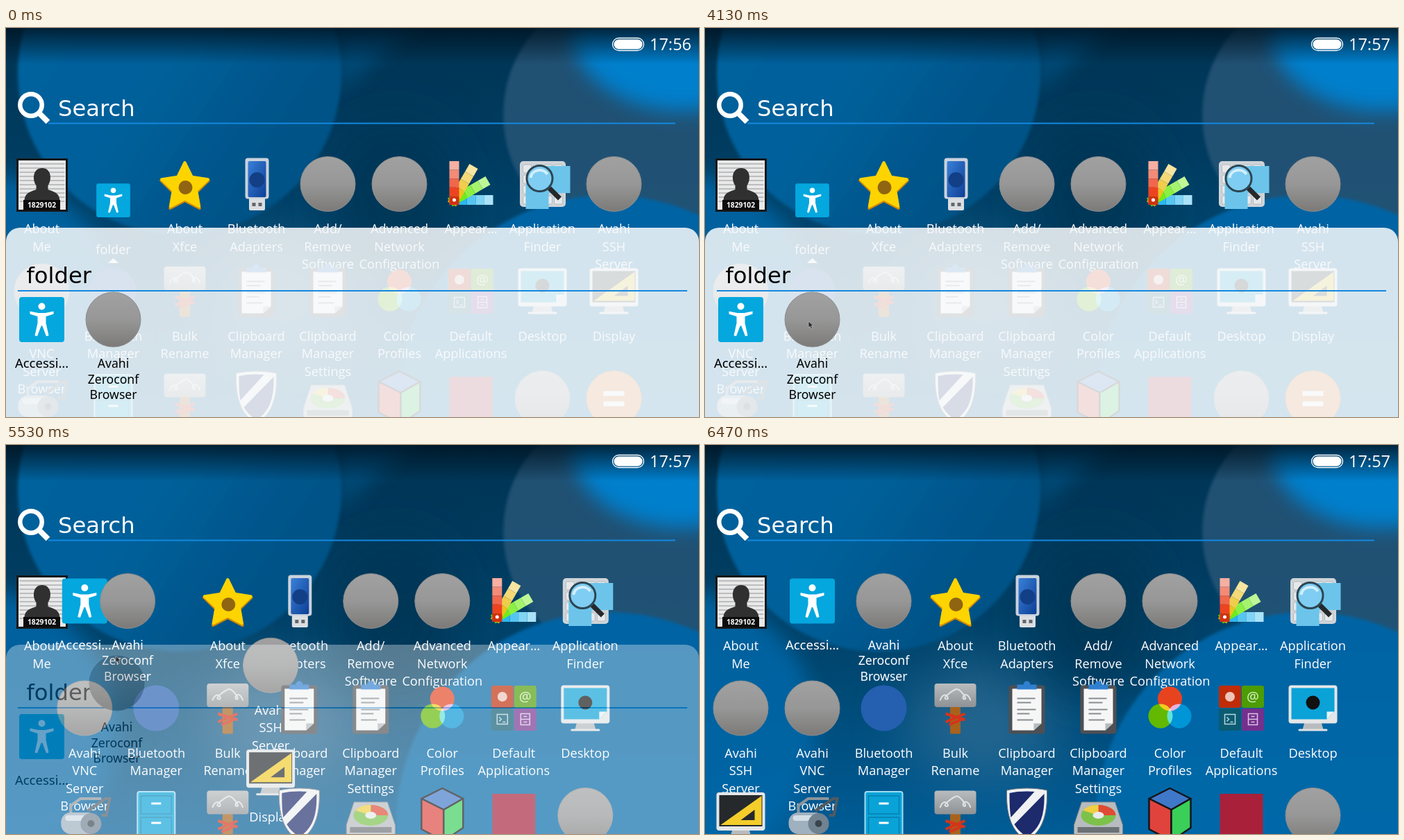
Recreate the animation shown at these times as an HTML page. Size 998x561 px, loop 7140 ms.

```html
<!DOCTYPE html>
<html lang="en">
<head>
<meta charset="utf-8">
<title>Launcher folder</title>
<style>
html, body { margin: 0; width: 100%; height: 100%; overflow: hidden; background: #003a60; }
svg { display: block; width: 100vw; height: 100vh; }
.label { font: 18.2px "Open Sans", "Noto Sans", sans-serif; fill: #fff; text-anchor: middle; }
.small { font-family: "Noto Sans", "Open Sans", sans-serif; }
.dark .label { fill: #000; }
.big { font: 32.2px "DejaVu Sans", sans-serif; }
.clock { font: 23.5px "Open Sans", "Noto Sans", sans-serif; fill: #fff; }
.num { font: bold 10.3px "Noto Sans", sans-serif; fill: #fff; text-anchor: middle; }
.at { font: 20px "Noto Sans", sans-serif; fill: #d9efc0; text-anchor: middle; }
.mix { isolation: isolate; }
.mix circle { mix-blend-mode: screen; }
</style>
</head>
<body>
<svg id="stage" viewBox="0 0 998 561" preserveAspectRatio="none">
  <defs>
    <linearGradient id="base" x2="0" y2="1">
      <stop offset="0" stop-color="#003453"/><stop offset=".3" stop-color="#003c60"/>
      <stop offset=".55" stop-color="#00466f"/><stop offset="1" stop-color="#005c96"/>
    </linearGradient>
    <linearGradient id="leftDisc" x2=".9" y2=".6">
      <stop offset="0" stop-color="#02649f"/><stop offset=".6" stop-color="#01609a"/><stop offset="1" stop-color="#005286"/>
    </linearGradient>
    <linearGradient id="rightDisc" x2="0" y2="1">
      <stop offset="0" stop-color="#0064a3"/><stop offset=".5" stop-color="#0068a8"/><stop offset="1" stop-color="#0474b6"/>
    </linearGradient>
    <linearGradient id="topShade" x2="0" y2="1">
      <stop offset="0" stop-color="#001524" stop-opacity=".85"/><stop offset="1" stop-color="#001524" stop-opacity="0"/>
    </linearGradient>
    <linearGradient id="grey" x2="0" y2="1">
      <stop offset="0" stop-color="#a1a1a1"/><stop offset=".5" stop-color="#979797"/><stop offset="1" stop-color="#7b7a78"/>
    </linearGradient>
    <linearGradient id="blue" x2="1" y2="1">
      <stop offset="0" stop-color="#3a80d8"/><stop offset="1" stop-color="#0d3f96"/>
    </linearGradient>
    <linearGradient id="metal" x2="0" y2="1">
      <stop offset="0" stop-color="#b9bcbe"/><stop offset="1" stop-color="#8f9294"/>
    </linearGradient>
    <filter id="soft" x="-50%" y="-50%" width="200%" height="200%"><feGaussianBlur stdDeviation="14"/></filter>
    <filter id="wide" x="-80%" y="-80%" width="260%" height="260%"><feGaussianBlur stdDeviation="40"/></filter>
    <filter id="edge"><feGaussianBlur stdDeviation="2"/></filter>
  </defs>

  <rect width="998" height="561" fill="url(#base)"/>
  <circle cx="-40" cy="410" r="200" fill="#0069ab" opacity=".8" filter="url(#soft)"/>
  <ellipse cx="400" cy="400" rx="110" ry="85" fill="#447a9e" opacity=".5" filter="url(#wide)"/>
  <ellipse cx="560" cy="250" rx="90" ry="110" fill="#003150" opacity=".7" filter="url(#wide)"/>
  <path d="M470 -30H610L480 95Z" fill="#005286" opacity=".7" filter="url(#soft)"/>
  <circle cx="250" cy="65" r="233" fill="url(#leftDisc)" filter="url(#edge)"/>
  <circle cx="900" cy="125" r="184" fill="#275577" opacity=".85" filter="url(#edge)"/>
  <ellipse cx="975" cy="5" rx="160" ry="115" fill="#067fcc" filter="url(#soft)"/>
  <circle cx="868" cy="547" r="306" fill="url(#rightDisc)" filter="url(#edge)"/>
  <rect width="998" height="52" fill="url(#topShade)"/>

  <rect x="873.5" y="14.5" width="45" height="18" rx="9" fill="none" stroke="#fff" stroke-width="1.3"/>
  <rect x="875.5" y="16.500" width="41" height="14" rx="7" fill="#fff"/>
  <text id="clock" class="clock" x="927" y="32.300">17:56</text>

  <g fill="none" stroke="#fff">
    <circle cx="36" cy="111" r="15.7" stroke-width="6.500"/>
    <path d="M47.500 122.500L60.500 135.500" stroke-width="8"/>
  </g>
  <path d="M61 137.500H964" stroke="#1488df" stroke-width="2"/>
  <text class="big" x="75" y="126.500" fill="#fff">Search</text>

  <g id="grid"></g>
  <g id="folder"></g>
  <g id="panel" class="dark">
    <path d="M0 561V308A20 20 0 0 1 20 288H978A20 20 0 0 1 998 308V561Z" fill="#f7fafb" fill-opacity=".86"/>
    <text class="big" x="29.500" y="368">folder</text>
    <path d="M17 379H981" stroke="#1488df" stroke-width="2"/>
  </g>
  <path id="cursor" d="M0 0V9L2.200 7.300L4 10.800L5.600 10L4 6.700L6.800 6.300Z" fill="#26282a" stroke="#c4c4c4" stroke-width=".7"/>
</svg>
<script>
const $ = id => document.getElementById(id);
const rect = (x, y, w, h, fill, more = '') =>
  `<rect x="${x}" y="${y}" width="${w}" height="${h}" fill="${fill}" ${more}/>`;
const circle = (x, y, r, fill, more = '') => `<circle cx="${x}" cy="${y}" r="${r}" fill="${fill}" ${more}/>`;
const shape = (d, fill, more = '') => `<path d="${d}" fill="${fill}" ${more}/>`;
const line = (d, color, width = 2) => shape(d, 'none', `stroke="${color}" stroke-width="${width}"`);
const repeat = (n, make) => Array.from({ length: n }, (_, i) => make(i)).join('');

const starPath = (r, inner) => 'M' + Array.from({ length: 10 }, (_, i) => {
  const a = (i / 5 - 0.5) * Math.PI, d = i % 2 ? inner : r;
  return `${(d * Math.cos(a)).toFixed(1)} ${(d * Math.sin(a)).toFixed(1)}`;
}).join('L') + 'Z';

const strip = (angle, hue, light) => `<g transform="translate(-24 23) rotate(${angle})">` +
  repeat(5, i => rect(-7, -56 + i * 12.6, 14, 12.6, `hsl(${hue} 85% ${light - i * 9}%)`)) + '</g>';

const monitor = screen =>
  shape('M-12 20H12L15 31H-15Z', '#b9bcbf') + rect(-21, 30, 42, 3, '#dfe1e3', 'rx="1.5"') +
  rect(-35, -33, 70, 55, '#e4e6e8', 'rx="4"') + screen;

const icons = {
  disc: circle(0, 0, 39.5, 'url(#grey)', 'stroke="#8d8d8d"'),
  me: rect(-35, -35.5, 71, 74, '#e9e9e9', 'stroke="#16181a" stroke-width="3"') +
    line(repeat(10, i => `M-32 ${-29 + i * 6}H33`), '#aeb0b2', 1.5) +
    shape('M-25 30C-26 14 -20 12 -8 8V2C-14 -6 -13 -23 0.500 -23S15 -6 9 2V8C21 12 27 14 26 30Z', '#303030') +
    rect(-26.5, 23, 53, 15, '#0c0c0c') + '<text class="num" y="34">1829102</text>',
  access: rect(-32.5, -32.5, 65, 65, '#04a7de', 'rx="4"') + circle(0, -19, 5, '#fff') +
    shape('M-17 -12L-5 -9.500H5L17 -12V-8L6 -4.500V5L10 23L6.500 24L0.800 9H-0.800L-6.500 24L-10 23L-6 5V-4.500L-17 -8Z', '#fff'),
  star: `<g transform="translate(0 4)" stroke-linejoin="round" stroke-width="4">` +
    shape(starPath(36, 18), '#d18a00', 'stroke="#d18a00" transform="translate(0 2)"') +
    shape(starPath(35, 17.5), '#fdd400', 'stroke="#fdd400"') + '</g>' + circle(1, 5, 10, '#8f6512'),
  usb: rect(-10.5, 19, 23, 19, '#dcdfe2', 'rx="2"') + rect(-6, 27, 5, 5, '#63676b') + rect(3, 27, 5, 5, '#63676b') +
    rect(-16, -37.5, 34, 59, '#c9d2dc', 'rx="4"') + rect(-12, -33, 26, 52, 'url(#blue)', 'rx="2"') +
    circle(1, -6, 11, '#123f86'),
  fan: strip(90, 197, 82) + strip(60, 95, 78) + strip(30, 47, 80) + strip(0, 10, 80) + circle(-24, 23, 2.5, '#fff'),
  finder: rect(-32.5, -33, 66, 66, '#cfd4d8', 'rx="5"') +
    repeat(16, i => rect(-28 + i % 4 * 15, -28 + (i >> 2) * 15, 12, 12, '#e6e9eb', 'rx="2" stroke="#aab1b7" stroke-width=".8"')) +
    rect(0, -26, 40, 39, '#6cc4ea') + rect(-24, 0, 33, 36, '#6cc4ea') +
    line('M10 6L25 21', '#26282b', 7) +
    circle(-4, -8, 18.5, '#7fcdf2', 'stroke="#2c4654" stroke-width="3"') +
    line('M-17 -9C-15 -22 2 -23 7 -14', '#d3effc', 4),
  bt: circle(0, 0, 33, '#245fb0'),
  hammer: rect(-7.5, -3, 15, 40, '#a8621c', 'rx="2"') + line('M-14 8L14 17M14 8L-14 20M-9 24L12 15', '#d5341b', 4) +
    rect(-30, -35.5, 60, 34, 'url(#metal)', 'rx="4"') +
    line('M-22 -11C-16 -28 -6 -12 -13 -13S-6 -24 0 -27S19 -12 13 -13S16 -28 22 -11', '#dfe2e3'),
  clip: rect(-26, -33, 52, 70, '#4d5054', 'rx="4"') + shape('M-21 -28H21V22L10 32H-21Z', '#f6f6f6') +
    shape('M21 22H10V32Z', '#b7babd') +
    line('M-14 -14H12M-14 -8H6M-14 2H13M-14 8H4M-14 17H9', '#8a8d90', 1.8) +
    shape('M-14 -27V-34H-5A5 5 0 0 1 5 -34H14V-27Z', '#2f7fd0'),
  color: '<g class="mix">' + circle(0, -13.5, 17.5, '#e8431f') + circle(-13.5, 11.5, 17.5, '#62b900') +
    circle(13.5, 11.5, 17.5, '#0095d6') + '</g>',
  tiles: rect(-32.5, -32.5, 32, 32, '#c02c08', 'rx="3"') + rect(0.5, -32.5, 32, 32, '#4c9c04', 'rx="3"') +
    rect(-32.5, 0.5, 32, 32, '#0b5b72', 'rx="3"') + rect(0.5, 0.5, 32, 32, '#74308d', 'rx="3"') +
    circle(-16.5, -16.5, 7, '#efc4b8') + '<text class="at" x="16.500" y="-10">@</text>' +
    line('M-24 9H-9V23H-24ZM-21 13L-18 16L-21 19M-16 20H-12', '#b8d5de', 1.5) +
    line('M10 8H23V24H10ZM10 16H23M14 12H19M14 20H19', '#dcc3e6', 1.5),
  desktop: monitor(shape('M-31 -29H31V5L20 16H-31Z', '#0ba2d8') + shape('M31 5H20V16Z', '#e8f3f8') +
    circle(0, -8, 10, '#111')),
  display: monitor(rect(-31, -29, 62, 45, '#25292c') +
    shape('M-29 14L30 -28V14ZM0 7H20V-8Z', '#f4cd2a', 'fill-rule="evenodd"')),
  roller: line('M4 -6L30 -24H36L31 0H24', '#515a61', 4) + line('M-20 2V-14L-6 -24H24', '#8a949c', 4) +
    rect(-34, -4, 52, 31, '#9fb0be', 'rx="14"') + rect(-28, 0, 36, 8, '#d3dde5', 'rx="4"') +
    circle(9, 12, 15, '#718290') + circle(9, 12, 5, '#39444d'),
  cabinet: rect(-27, -34, 54, 72, '#0aa3d8', 'rx="3" stroke="#9fdcf3" stroke-width="2"') +
    line('M-22 -28H22V-2H-22ZM-22 3H22V32H-22Z', '#077fae', 1.5) +
    line('M-7 -17H7M-7 11H7', '#fff', 3),
  shield: shape('M-29 -36C-12 -40 12 -40 29 -36C30 0 22 24 0 36C-22 24 -30 0 -29 -36Z', '#f0f1f3', 'stroke="#70757c"') +
    shape('M-25 -32C-14 -35 2 -35 11 -34L-23 3C-25 -8 -25 -20 -25 -32Z', '#1d2a6b') +
    shape('M25 -31C26 0 19 20 0 31C-8 26 -14 20 -18 13Z', '#1d2a6b'),
  disk: shape('M-24 -19H24L35 14V28H-35V14Z', '#b8bcbf', 'stroke="#858a8e"') +
    `<ellipse cy="0" rx="25" ry="15" fill="#7cc24a"/>` + shape('M0 0V-15A25 15 0 0 1 25 0Z', '#e04a35') +
    shape('M0 0L-22 -7A25 15 0 0 1 0 -15Z', '#f0cf42') + `<ellipse rx="8" ry="5" fill="#e8eaeb"/>` +
    rect(-30, 17, 60, 8, '#6c7175'),
  cube: '<g stroke="#15151a" stroke-width="2.500" stroke-linejoin="round">' +
    shape('M0 -39L30 -24L2 -8L-30 -24Z', '#3f78c8') + shape('M-30 -24L2 -8V37L-30 20Z', '#e0433c') +
    shape('M30 -24L2 -8V37L30 18Z', '#39cf58') + '</g>',
  square: rect(-31, -31, 62, 62, '#a8203a'),
  equals: circle(0, 0, 39.5, '#f08a3c', 'stroke="#d8701f"') + line('M-15 -7H15M-15 8H15', '#fff', 7)
};

// [icon, label lines, size of a compact label]
const apps = [
  ['me', 'About|Me'], ['access', 'Accessi…', 18.5], ['disc', 'Avahi|Zeroconf|Browser', 17.6],
  ['star', 'About|Xfce'], ['usb', 'Bluetooth|Adapters'], ['disc', 'Add/|Remove|Software'],
  ['disc', 'Advanced|Network|Configuration'], ['fan', 'Appear…'], ['finder', 'Application|Finder'],
  ['disc', 'Avahi|SSH|Server'], ['disc', 'Avahi|VNC|Server|Browser'], ['bt', 'Bluetooth|Manager'],
  ['hammer', 'Bulk|Rename'], ['clip', 'Clipboard|Manager'], ['clip', 'Clipboard|Manager|Settings'],
  ['color', 'Color|Profiles'], ['tiles', 'Default|Applications'], ['desktop', 'Desktop'],
  ['display', 'Display'], ['roller', ''], ['cabinet', ''], ['hammer', ''], ['shield', ''], ['disk', ''],
  ['cube', ''], ['square', ''], ['disc', ''], ['equals', '']
];

function addItem(parent, [icon, label, size]) {
  const g = document.createElementNS('http://www.w3.org/2000/svg', 'g');
  const top = size ? 69.5 : 71, gap = size ? 22.5 : 25.5;
  const attrs = size ? `class="label small" style="font-size:${size}px"` : 'class="label"';
  g.innerHTML = `<g>${icons[icon]}</g>` +
    label.split('|').map((s, i) => `<text ${attrs} y="${top + i * gap}">${s}</text>`).join('');
  parent.append(g);
  return g;
}
const place = (el, x, y) => el.setAttribute('transform', `translate(${x.toFixed(2)} ${y.toFixed(2)})`);
const show = (el, on) => el.style.display = on ? '' : 'none';

const items = apps.map(app => addItem($('grid'), app));
$('folder').innerHTML = `<g transform="translate(154.500 248.500) scale(.75)">${icons.access}</g>` +
  '<text class="label" x="154.500" y="326">folder</text>' + shape('M147 339L154.500 332L162 339Z', '#fff');
place(addItem($('panel'), apps[1]), 51.5, 420.5);
const dragged = addItem($('panel'), apps[2]);

const slot = i => [51.5 + 103 * (i % 9), 225 + 154.5 * Math.floor(i / 9)];

// Waypoints: [tick, x, y]
const pointer = [
  [6, 953, 165], [7, 755, 207], [8, 527, 262], [9, 527, 262], [10, 440, 242], [13, 150, 285], [15, 4, 380],
  [17, 110, 452], [19, 310, 461], [20, 355, 455], [21, 355, 455], [24, 285, 437], [28, 190, 415], [32, 149, 423],
  [66, 149, 423], [67, 151, 414], [70, 156.5, 367], [73, 157, 326], [76, 157, 304], [79, 157, 304],
  [80, 158, 304.5], [91, 158, 304.5], [92, 215, 290], [94, 520, 222], [96, 900, 146]
];
const drag = [
  [67, 154.5, 420.5], [68, 155, 417], [70, 157, 397.5], [73, 158.5, 364], [75, 159.3, 347], [76, 159.5, 343.5]
];
function along(path, t) {
  if (t <= path[0][0]) return path[0].slice(1);
  const n = path.findIndex(p => p[0] >= t);
  if (n < 0) return path[path.length - 1].slice(1);
  const [a, ax, ay] = path[n - 1], [b, bx, by] = path[n], u = (t - a) / (b - a);
  return [ax + (bx - ax) * u, ay + (by - ay) * u];
}

const LOOP = 7140, TICK = 200 / 3, DROP = 82;
const settle = [0, 0.6, 0.922, 1];

function draw(ms) {
  const k = Math.floor((ms + 4) / TICK);
  const p = settle[Math.max(0, Math.min(3, k - DROP))];
  const dropped = k >= DROP;

  items.forEach((el, i) => {
    const [ax, ay] = slot(i < 3 ? 0 : i - 1), [bx, by] = slot(i);
    place(el, ax + (bx - ax) * p, ay + (by - ay) * p);
    show(el, dropped || i < 1 || i > 2);
  });
  show(items[2].firstChild, k > DROP);
  show($('folder'), !dropped);
  show($('panel'), k < DROP + 2);
  $('panel').style.opacity = 1 - p;
  place(dragged, ...along(drag, k));

  show($('cursor'), k >= 6 && k < 97);
  place($('cursor'), ...along(pointer, k));
  $('clock').textContent = k < 62 ? '17:56' : '17:57';
}

const start = performance.now();
function tick() {
  draw((performance.now() - start) % LOOP);
  requestAnimationFrame(tick);
}
draw(0);
requestAnimationFrame(tick);
</script>
</body>
</html>
```
